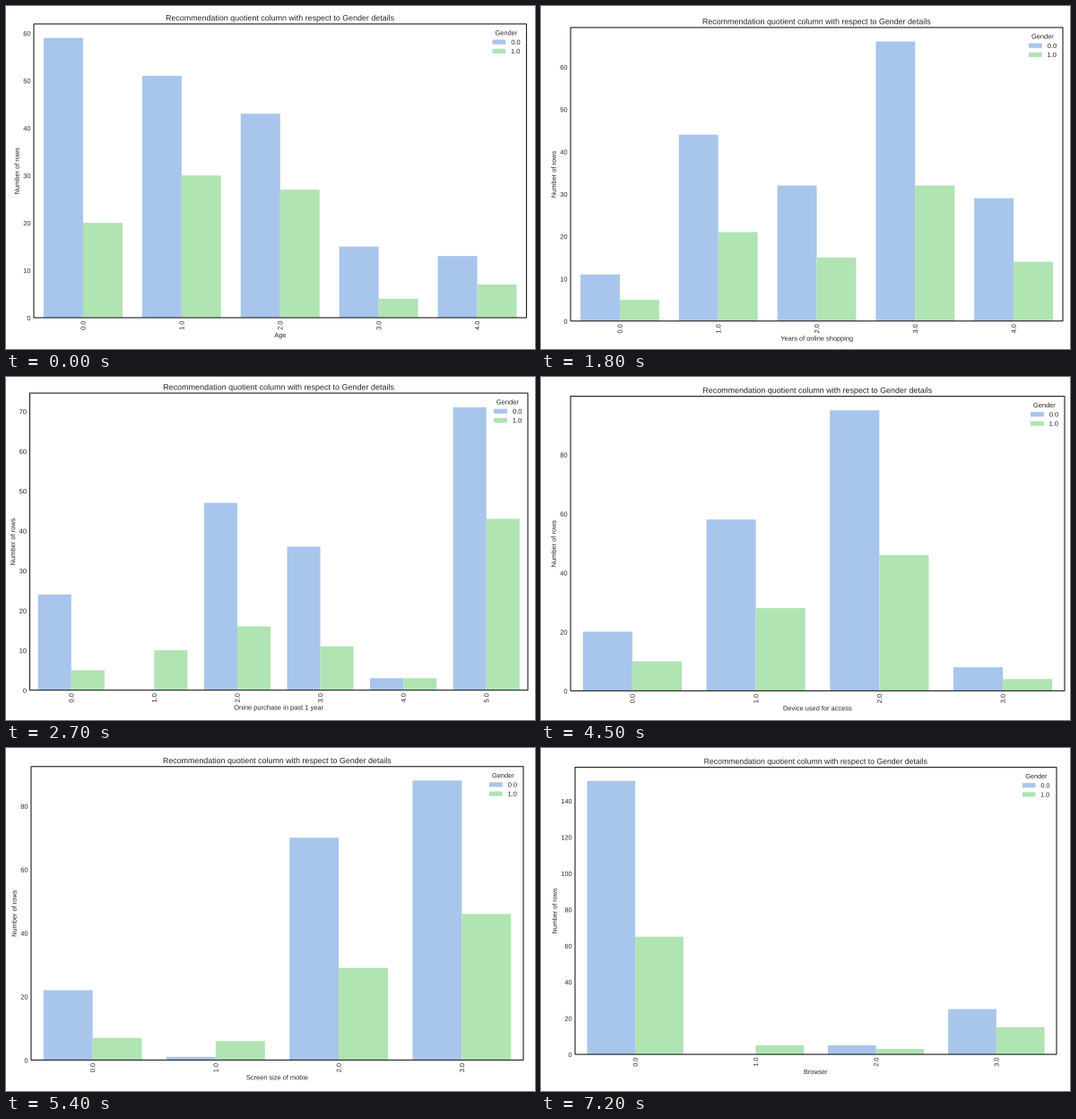
A matplotlib script that plays this animation: 590 px wide and 383 px high, repeating every 8 s.

```python
import matplotlib.pyplot as plt
from matplotlib.animation import FuncAnimation
from matplotlib.patches import PathPatch, Rectangle
from matplotlib.textpath import TextPath
from matplotlib.transforms import Affine2D

W, H, DPI = 590, 383, 100
INK = "#262626"
BLUE, GREEN = "#a8c5ec", "#b0e4b3"
TITLE = "Recommendation quotient column with respect to Gender details"
ASPECT = 1.675
MALE_SHARE = 181 / 269

plt.rcParams["font.family"] = "Liberation Sans"


def split(*totals):
    """Divide category totals between the genders by their overall share."""
    male = [round(n * MALE_SHARE) for n in totals]
    return male, [n - m for n, m in zip(totals, male)]


# label, (left, right, top), (rows of gender 0, rows of gender 1)
CHARTS = [
    ("Age", (31, 580.5, 20),
     ([59, 51, 43, 15, 13], [20, 30, 27, 4, 7])),
    ("City", (33, 581, 23.5),
     ([34, 0, 18, 17, 42, 11, 20, 9, 0, 12, 18],
      [3, 2, 40, 1, 1, 1, 7, 0, 5, 28, 0])),
    ("Years of online shopping", (33, 582, 24),
     split(16, 65, 47, 98, 43)),
    ("Onine purchase in past 1 year", (26.5, 582, 18),
     ([24, 0, 47, 36, 3, 71], [5, 10, 16, 11, 3, 43])),
    ("Mode of internet access", (30, 580, 23.8),
     ([0, 27, 85, 69], [4, 20, 57, 7])),
    ("Device used for access", (33, 584, 21.5),
     split(30, 86, 141, 12)),
    ("Screen size of mobie", (28, 577, 20.7),
     ([22, 1, 70, 88], [7, 6, 29, 46])),
    ("Operating system", (34, 584, 18.5),
     split(85, 62, 122)),
    ("Browser", (38, 575, 21.5),
     ([151, 0, 5, 25], [65, 5, 3, 15])),
]

fig = plt.figure(figsize=(W / DPI, H / DPI), dpi=DPI, facecolor="white")
ax = fig.add_axes([0, 0, 1, 1])
ax.set_xlim(0, W)
ax.set_ylim(H, 0)
ax.axis("off")


def tick_step(peak):
    """Smallest round step that needs at most nine intervals."""
    return next(s for s in (1, 2, 5, 10, 20, 50) if s >= peak / 9)


def build(name, box, rows):
    """Draw one bar chart in pixel coordinates and return its artists."""
    left, right, top = box
    bottom = top + (right - left) / ASPECT
    mid_x, mid_y = (left + right) / 2, (top + bottom) / 2
    big = (right - left) / 61.8
    small = big / 1.2
    half_cap = 0.36 * small
    count = len(rows[0])
    peak = 1.05 * max(map(max, rows))
    scale = (bottom - top) / peak
    parts = []

    def text(x, y, s, size=small, align=0.5, angle=0):
        """Set s on a baseline; align is the share of its width before x."""
        path = TextPath((0, 0), s, size=size)
        ink = path.get_extents()
        place = (Affine2D().translate(-ink.x0 - align * ink.width, 0)
                 .scale(1, -1).rotate_deg(-angle).translate(x, y))
        parts.append(ax.add_patch(PathPatch(place.transform_path(path),
                                            facecolor=INK, linewidth=0)))

    def rect(x, y, w, h, **style):
        parts.append(ax.add_patch(Rectangle((x, y), w, h, snap=False,
                                            **style)))

    slot = (right - left) / count
    for i in range(count):
        center = left + (i + 0.5) * slot
        for values, x, color in zip(rows, (center - 0.4 * slot, center),
                                    (BLUE, GREEN)):
            height = values[i] * scale
            rect(x, bottom - height, 0.4 * slot, height,
                 facecolor=color, linewidth=0)
        text(center + half_cap, bottom + 3.8, f"{i}.0", align=1, angle=90)

    for value in range(0, int(peak) + 1, tick_step(peak)):
        y = bottom - value * scale + 0.4 + half_cap
        text(left - 3.8, y, str(value), align=1)

    rect(left, top, right - left, bottom - top, fill=False, edgecolor=INK,
         linewidth=1.15 * 72 / DPI, zorder=3)

    # Longer tick labels push the axis names outwards.
    wide_ticks = 0.556 * small if peak >= 100 else 0
    long_names = 0.5 * small if count > 10 else 0
    text(mid_x, top - 3.7, TITLE, big)
    text(mid_x, bottom + 21.9 + long_names, name)
    text(left - 16.3 - wide_ticks, mid_y, "Number of rows", angle=90)

    key_x = left + 6 if count > 10 else right - 38
    text(key_x + 15.5, top + 9.8 + half_cap, "Gender")
    for row, color in enumerate((BLUE, GREEN)):
        y = top + 20.2 + 10.2 * row
        rect(key_x, y - 2.6, 2 * small, 5.2, facecolor=color, linewidth=0)
        text(key_x + 2.85 * small, y + half_cap, f"{row}.0", align=0)
    return parts


slides = [build(*chart) for chart in CHARTS]


def show(frame):
    current = min(frame // 9, len(slides) - 1)
    for i, parts in enumerate(slides):
        for part in parts:
            part.set_visible(i == current)
    return []


anim = FuncAnimation(fig, show, frames=80, interval=100, repeat=True,
                     repeat_delay=0, init_func=lambda: show(0))
plt.show()
```
